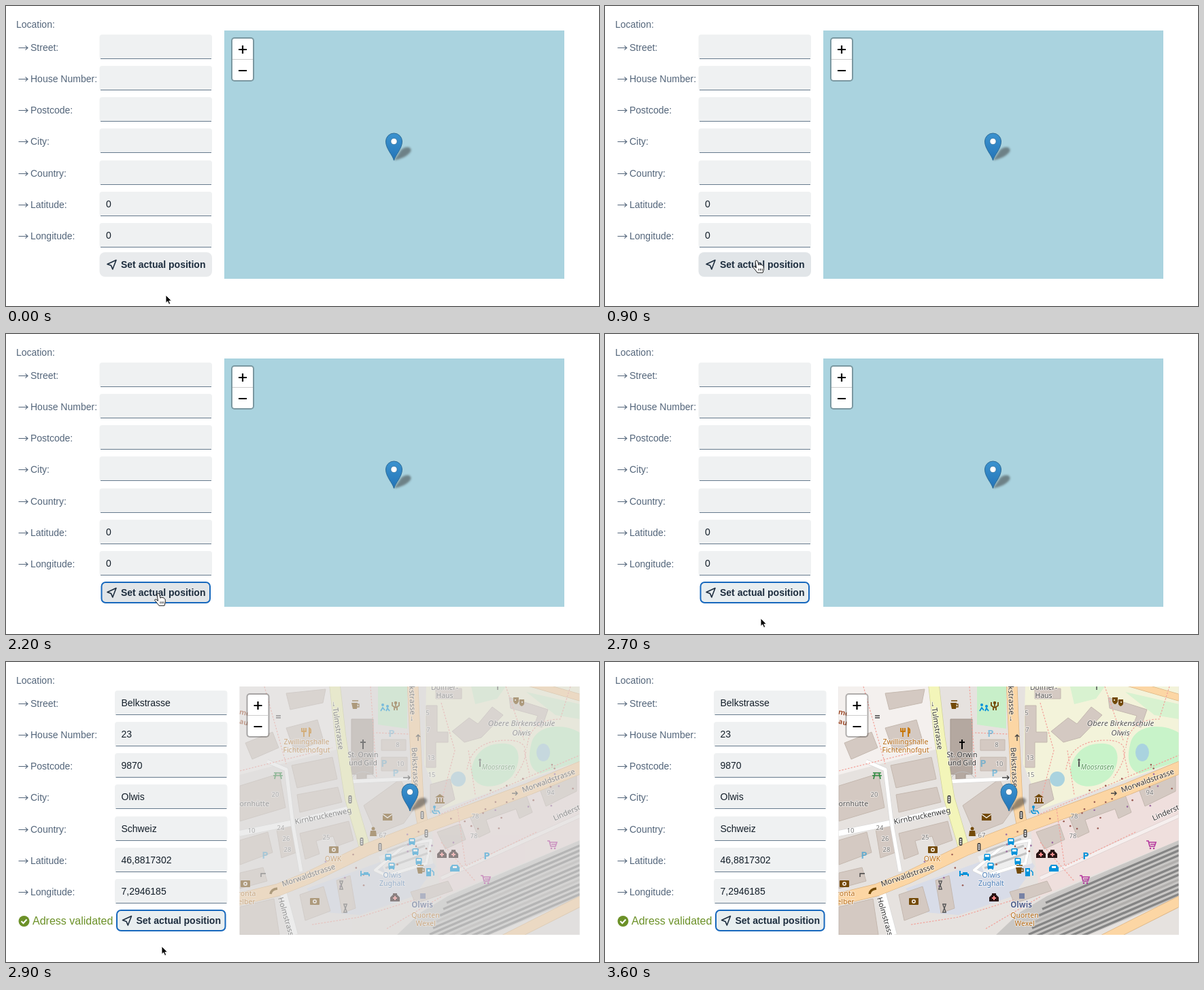
An HTML page that plays this animation: 872 by 441 pixels, repeating every 5.5 s.

```html
<!DOCTYPE html>
<html lang="en">
<head>
<meta charset="utf-8">
<title>Location form</title>
<style>
html, body { margin: 0; width: 100%; height: 100%; overflow: hidden; background: #fff }
svg { display: block; font: 14px "Liberation Sans", Arial, sans-serif }
.label { fill: #53657a }
.value { fill: #131e29 }
.map text { font: 10.5px "Noto Sans", sans-serif; text-anchor: middle; fill: #333;
  stroke: #fff; stroke-opacity: .55; stroke-width: 2px; paint-order: stroke; stroke-linejoin: round }
.map .num { font-size: 9.5px; fill: #777 }
.map .sign { font-weight: bold; font-size: 15px; stroke: none }
</style>
</head>
<body>
<svg id="stage" width="872" height="441" viewBox="0 0 872 441"></svg>
<script>
const path = (d, fill, stroke = 'none', width = 1, more = '') =>
  `<path d="${d}" fill="${fill}" stroke="${stroke}" stroke-width="${width}" ${more}/>`;
const line = (d, color, width, more = '') => path(d, 'none', color, width, more);
const rect = (x, y, w, h, fill, more = '') =>
  `<rect x="${x}" y="${y}" width="${w}" height="${h}" fill="${fill}" ${more}/>`;
const circle = (x, y, r, fill, more = '') => `<circle cx="${x}" cy="${y}" r="${r}" fill="${fill}" ${more}/>`;
const at = (x, y, body) => `<g transform="translate(${x} ${y})">${body}</g>`;
const text = (x, y, s, more = '') => `<text x="${x}" y="${y}" ${more}>${s}</text>`;
const mapText = (x, y, s, angle = 0, style = '') =>
  text(x, y, s, `transform="rotate(${angle} ${x} ${y})" style="${style}"`);
const road = (d, fill, casing, width) =>
  line(d, casing, width + 1.4, 'stroke-linejoin="round"') + line(d, fill, width, 'stroke-linejoin="round"');
const each = (places, draw) => places.map(([x, y]) => at(x, y, draw)).join('');

let seed = 7;
const random = () => (seed = seed * 16807 % 2147483647) / 2147483647;

const rows = [
  ['Street', 'Belkstrasse'], ['House Number', '23'], ['Postcode', '9870'], ['City', 'Olwis'],
  ['Country', 'Schweiz'], ['Latitude', '46,8817302'], ['Longitude', '7,2946185']
];
const rowY = i => Math.round(42 + i * 46.15);

const labels = text(15, 32, 'Location:', 'class="label"') + rows.map(([name], i) => {
  const y = rowY(i) + 19.5;
  return line(`M18.5 ${y}H32M28.5 ${y - 3.2}L32 ${y} 28.5 ${y + 3.2}`, '#53657a', 1.1) +
    text(36, y + 4.3, name + ':', 'class="label"');
}).join('');

const fields = rows.map(([, value], i) => {
  const y = rowY(i);
  return rect(137.5, y, 165.5, 36, '#eff1f2', 'rx="4"') +
    line(`M139 ${y + 35.5}H302`, '#667a8d', 1) +
    `<text class="value" x="147" y="${y + 23}" data-before="${i > 4 ? 0 : ''}" data-after="${value}"></text>`;
}).join('');

const button = `<g id="button" fill="#1d2d3e">
  <rect id="halo" x="138" y="362.5" width="164" height="35" rx="8" fill="#fff" stroke="#0064d9"/>
  <rect id="face" rx="8"/>
  <path id="plane" d="M149 379.5L162 373.5 156.8 387 154.6 381.6z" fill="none" stroke-width="1.6" stroke-linejoin="round"/>
  ${text(169, 385, 'Set actual position', 'font-weight="bold"')}</g>`;

const zoom = rect(331, 46, 34, 65, '#000', 'rx="5" opacity=".28"') + rect(333, 48, 30, 61, '#fff', 'rx="3"') +
  line('M333 78.5H363', '#ccc', 1) + line('M342 64H354M348 58V70M342 95H354', '#000', 2.2);

// The tip of the pin is the origin
const pin = path('M0 0L11-16C18-22 26-20 25-14 22-7 10-2 0 0z', '#333', 'none', 0, 'opacity=".5" filter="url(#soft)"') +
  path('M0 0C-2-8-12-17-12-28A12 12 0 0 1 12-28C12-17 2-8 0 0z', 'url(#blue)', '#2e6c97') +
  circle(0, -28, 4.6, '#fff', 'stroke="#2e6c97" stroke-width=".7"');

function buildMap() {
  const brown = '#734a08', blue = '#0092da', orange = '#fcd6a4', edge = '#dcb482';
  let s = rect(343, 36, 501, 365, '#e6e2df');

  // Land use
  s += path('M343 36H480L488 128 343 166z', '#f4f0ee') + path('M625 240L844 160V262L640 345z', '#efdfdd');
  s += path('M618 36H844V146L642 216 615 150z', '#f3f3da') + path('M547 36H590V98L547 92z', '#c8efc9');
  s += path('M684 160C688 132 708 118 735 120 758 122 758 148 744 168 728 186 688 192 684 160z', '#c8f3c9');
  s += path('M772 122C778 90 822 90 844 104V146L786 164C768 158 768 138 772 122z', '#c8f3c9');
  s += path('M684 36H735L722 54 690 62z M765 44L844 62V84L808 78z', '#d8f2d0');
  s += circle(665, 172, 11, '#aad3df') + '<ellipse cx="790" cy="133" rx="10" ry="13" fill="#aad3df"/>';
  s += path('M442 333L545 296 610 270 632 300 600 344 520 372 470 368z', '#d8dce8');
  s += path('M548 286L622 258 628 296 560 316z', '#eeeeee');

  // Railway
  s += path('M610 368L650 344 844 262V346L712 401H575z', '#c9c7c5');
  for (let k = 0; k < 12; k++) {
    const x = 648 - k * 5, y = 354 + k * 9.3;
    s += line(`M${x} ${y}L844 ${y - (844 - x) * .43}`, k % 4 == 3 ? '#b0aeac' : '#858585', 3.4);
  }
  s += path('M712 401L844 346V401z', '#e6e2df');

  // Buildings
  const west = 'M352 119L392 103 401 126 362 143zM412 97L458 85 467 116 424 131zM412 46L470 40 466 60 418 70z' +
    'M344 182L402 164 411 214 344 234zM420 152L480 140 487 172 428 185zM428 195L488 184 494 206 432 221z';
  const south = 'M432 252L504 234 511 262 486 271 481 256 456 263 461 282 440 290zM344 262L385 250 392 280 344 298z' +
    'M397 240L418 233 427 280 405 288zM344 310L378 302 384 322 344 333zM344 360L394 348 402 401H344z' +
    'M432 342L467 330 477 366 440 380zM486 321L506 314 514 362 494 369zM595 338L650 322 657 336 602 355z';
  const middle = 'M552 114H588V130H552zM552 140H590V160H552zM526 211L580 172 600 216 585 237 544 253z' +
    'M618 64H634V103H650V118H632V155H618zM624 180L653 172 660 202 624 222zM632 39H670V54H632z';
  const east = 'M656 102L681 82 694 91 715 66 731 78 699 111 674 118zM740 52L797 70 788 96 777 92 782 79 742 68z' +
    'M680 222L764 193 774 221 755 230 750 216 706 232 712 250 695 258zM785 187L839 166V190L794 212zM634 250L668 238 676 261 646 275z';
  for (const d of [west, south, middle, east]) s += path(d, '#d4c9c2', '#c4b8af');
  s += path('M508 84H540V165H530V172H516V165H508z', '#b4a8a0', '#a0938b');
  s += line('M508 172C515 158 535 158 545 172', '#bbb', 1);

  // Streets
  s += road('M343 252L418 237 512 214', '#fff', '#d8d8d8', 8) + road('M384 146L412 158 422 240 434 308', '#fff', '#d8d8d8', 5);
  s += road('M404 326L424 401', '#fff', '#d8d8d8', 10) + road('M500 176L606 171', '#fff', '#d8d8d8', 5);
  s += road('M543 306L588 268 625 262 618 296 560 314z', '#fff', '#d8d8d8', 4) + road('M640 318L844 226', '#f6efee', '#dccfce', 5);
  s += road('M483 30L492 110 506 200 528 274', '#f3f5b9', '#cfd09a', 15);
  s += road('M598 30L601 100 606 200 614 245', orange, edge, 15);
  s += road('M338 350L400 335 445 317 530 276 615 243 700 212 770 186 850 153', orange, edge, 17);
  s += road('M725 412L850 349', orange, edge, 14) + road('M760 28L850 54', orange, edge, 9);
  s += line('M560 279L612 260M556 291L616 270M558 303L620 281', '#c4c4c4', 3);

  // Footpaths
  const walks = 'M344 160L480 126M380 36L412 150M536 36L545 170M544 104L594 106M636 225L844 137M640 60L660 130 640 206' +
    'M680 130L690 195M678 158Q684 116 735 115T748 170M762 130L770 166M735 36L762 115M830 36L815 84Q770 84 766 126' +
    'M640 265L690 322M560 392L640 345M450 386L520 375 600 350M664 216L676 300 780 250';
  s += line(walks, '#f2a29a', 1.2, 'stroke-dasharray="2.5 2"');
  for (let i = 0; i < 45; i++) {
    const x = 470 + random() * 365;
    s += circle(x, 375 - (x - 430) * .43 - random() * 70, 1.3, i % 3 ? '#9b5d55' : '#9a6aa0');
  }

  // Symbols
  s += each([[482, 276], [454, 352], [352, 326]], rect(-7, -5, 14, 10, brown, 'rx="1"') +
    circle(0, 0, 3, '#f2e9df') + circle(0, 0, 1.3, brown));
  s += each([[506, 202], [523, 264], [550, 272], [612, 225], [618, 252]], rect(-2.5, -6, 5, 12, '#444', 'rx="2"') +
    circle(0, -3, 1.3, '#ddd') + circle(0, 0, 1.3, '#ddd') + circle(0, 3, 1.3, '#ddd'));
  s += each([[597, 264], [562, 287], [602, 279], [567, 300], [607, 293]], rect(-4.5, -5, 9, 9, blue, 'rx="1.5"') +
    rect(-3, -3.5, 6, 3, '#fff') + line('M-3 3V5M3 3V5', blue, 2));
  s += each([[641, 282], [658, 282], [572, 346]], path('M-3-6H3V-4L7 0V6H-7V0L-3-4z', '#281414') +
    line('M-3 1H3M0-2V4', '#ff8d8d', 2));
  s += each([[803, 268], [705, 319]], line('M-7-5H-4L-2 3H5L7-3H-3M-1 0H5', '#b5399f', 1.7) +
    circle(-1, 6, 1.3, '#b5399f') + circle(4, 6, 1.3, '#b5399f'));
  s += each([[513, 63], [609, 305]], path('M-5-3H4L3 6H-3z', brown) + line('M-4-6H5M4-1H6V3H3', brown, 1.3));
  s += each([[493, 328], [499, 362]], line('M-3-6H3M-3 6H3M-2-5L2 5M2-5L-2 5', '#555', 1.4));
  s += at(561, 228, rect(-7, -5, 14, 10, brown) + line('M-7-4L0 1 7-4', '#fff', 1.2));
  s += at(442, 103, line('M-4-6V7M-7-6V-1H-1V-6M4 7V-6Q7-5 6 1H4', '#c77400', 1.8));
  s += at(638, 201, path('M-7-2L0-7 7-2zM-7 5H7V7H-7z', brown) + line('M-4-1V5M0-1V5M4-1V5', brown, 2));
  s += at(754, 58, path('M-8-6H0V0Q-4 8-8 0zM1-3H8V4Q4 10 1 4z', brown) + circle(-5, -2, 1, '#fff') + circle(5, 1, 1, '#fff'));
  s += at(540, 250, circle(0, -5, 2.5, brown) + path('M-4-2H4L5 6H-5z', brown));
  s += at(394, 337, line('M-5 4Q-4-3 5-4', brown, 3.5));
  s += at(400, 167, line('M-6-4H6M-7 0H7M-3-4L-5 5M3-4L5 5', '#2f8a42', 1.7));
  s += at(525, 121, line('M0-7V7M-4-3H4', '#000', 2));
  s += at(528, 311, line('M-6-4V4M-6 1H6V4M-2-1H5', blue, 2));
  s += at(660, 303, path('M-7 5V-1L-4-5H4L7-1V5z', blue) + rect(-3, -3, 6, 3, '#fff'));
  s += at(623, 309, rect(-5, -6, 7, 12, blue) + line('M3-3L6 0V5', blue, 1.5) + rect(-3, -4, 3, 3, '#fff'));
  s += at(632, 217, circle(-2, -4, 2, blue) + line('M-2-3V2H4L6 6M-5 1Q-5 7 2 5', blue, 1.6));
  s += at(557, 67, circle(-3, -4, 2, blue) + circle(4, -2, 2, blue) + line('M-6 5L-3 0 0 4M2 5L4 1 7 5', blue, 1.8));
  s += at(573, 64, circle(0, -4, 2.2, brown) + line('M-5-5V0L-2 2V7M5-5V0L2 2V7M0-2V4', brown, 1.8));
  s += at(697, 148, circle(0, -4, 1.8, '#555') + line('M0-2V6', '#555', 2));
  s += rect(609, 340, 8, 8, '#7882a5');
  s += line('M397 82H404M397 79H404M375 316V311H382M723 36V41M744 193H752M749 190L752 193 749 196M606 116V107M603 110L606 107 609 110M584 170H594M591 167L594 170 591 173', '#444', 1.4);

  // Lettering
  const parking = (x, y, opacity) => text(x, y, 'P', `class="sign" style="fill:${blue};opacity:${opacity}"`);
  s += parking(567, 110, .4) + parking(556, 154, .4) + parking(573, 168, .4) + parking(381, 289, .5) + parking(707, 290, 1);
  const numbers = [[5, 620, 78], [7, 621, 103], [13, 625, 144], [15, 626, 169], [8, 576, 125], [10, 580, 153], [20, 396, 198],
    [10, 361, 251], [24, 404, 247], [26, 412, 263], [28, 414, 279], [25, 471, 261], [67, 554, 258], [78, 690, 230], [78, 688, 259], [94, 801, 195]];
  for (const [n, x, y] of numbers) s += text(x, y, n, 'class="num"');

  const street = 'font-size:11px', food = 'fill:#b86d18', water = 'fill:#4c7fb9', gray = 'fill:#555';
  const school = gray + ';font-style:italic;font-size:11.5px', cut = 'fill:#a05030;font-weight:bold';
  s += mapText(446, 317, 'Morwaldstrasse', -19, street) + mapText(799, 178, 'Morwaldstrasse', -20, street);
  s += mapText(484, 93, '→Tulmstrasse', 82, street) + mapText(598, 155, 'Belkstrasse', 87, street);
  s += mapText(594, 62, 'kstrasse→', 88, street) + mapText(467, 230, 'Kirnbruckenweg', -12, street);
  s += mapText(409, 378, 'Holmstrasse', 74, street) + mapText(826, 225, 'Linderst', -24, street);
  s += mapText(442, 121, 'Zwillingshalle', 0, food) + mapText(442, 133, 'Fichtenhofgut', 0, food);
  s += mapText(525, 140, 'St. Orwin') + mapText(525, 152, 'und Gild');
  s += mapText(758, 94, 'Obere Birkenschule', 0, school) + mapText(758, 108, 'Olwis', 0, school);
  s += mapText(724, 158, 'Moosrasen', 0, 'fill:#5d9a5f;font-style:italic;font-size:10px');
  s += mapText(362, 212, 'Kornhütte', 0, gray) + mapText(645, 41, 'Dolmer-', 0, gray) + mapText(645, 53, 'Haus', 0, gray);
  s += mapText(481, 293, 'OWK', 0, food) + mapText(354, 344, 'ronta', 0, food) + mapText(354, 356, 'elber', 0, food);
  s += mapText(568, 317, 'Olwis', 0, water) + mapText(568, 329, 'Zughalt', 0, water);
  s += mapText(612, 361, 'Olwis', 0, 'fill:#53628e;font-weight:bold;font-size:11.5px');
  s += mapText(617, 376, 'Quorten', 0, food) + mapText(617, 388, 'Wexel', 0, food);
  s += mapText(349, 78, 'lme', 12, cut) + mapText(349, 92, 'au', 12, cut);
  return s;
}

const stage = document.getElementById('stage');
stage.innerHTML = `<defs>
  <linearGradient id="blue" x2="0" y2="1"><stop stop-color="#3c93cf"/><stop offset="1" stop-color="#2374b8"/></linearGradient>
  <filter id="soft"><feGaussianBlur stdDeviation="1.8"/></filter>
  <clipPath id="frame"><rect x="343.5" y="36" width="500" height="365"/></clipPath></defs>
  ${labels}
  <g id="ok">${circle(26.5, 381, 8, '#6c9128')}${line('M22.5 381L25.5 384 30.5 378.5', '#fff', 2)}
    ${text(39, 385.5, 'Adress validated', 'font-size="16" fill="#6c9128"')}</g>
  <g class="shift">${fields}${button}<rect id="sea" x="321" y="36" width="500" height="365"/></g>
  <g id="map" class="map" clip-path="url(#frame)">${buildMap()}</g>
  <g class="shift">${zoom}</g><g id="pin">${pin}</g>
  <circle id="ripple" cx="223" cy="378" fill="#fff" fill-opacity=".3" stroke="#d9a5aa" stroke-width="3"/>
  <g id="cursor" stroke-linejoin="round">
    <path id="arrow" d="M0 0V11.5L2.7 9.1 4.6 13.5 6.7 12.6 4.8 8.4H8.4z" fill="#000" stroke="#fff" stroke-width=".9"/>
    <path id="hand" d="M-1 1Q1-1 2.5 1L4 7 5 5.5 7 6.5 8 6 10 7.5 11 8.5 11.5 13 10 18H2L-1 14-4.5 10Q-4 8-2 9L.5 11zM4 12V15M6.5 12V15M9 12V15" fill="#fff" stroke="#222" stroke-width="1"/>
  </g>`;

const el = Object.fromEntries([...stage.querySelectorAll('[id]')].map(e => [e.id, e]));
const values = stage.querySelectorAll('.value');
const set = (e, attrs) => { for (const k in attrs) e.setAttribute(k, attrs[k]); };
const show = (e, on) => set(e, { display: on ? 'inline' : 'none' });

// time, x, y of the pointer
const track = [[0, 235, 425], [500, 231, 410], [600, 229, 396], [900, 222, 374], [2100, 222, 374],
  [2400, 225, 396], [2700, 229, 418], [3300, 229, 418], [3500, 265, 434], [3600, 280, 445]];

function pointer(t) {
  const i = track.findIndex(p => p[0] > t);
  if (i < 0) return [280, 445];
  const [t0, x0, y0] = track[i - 1], [t1, x1, y1] = track[i], u = (t - t0) / (t1 - t0);
  return [x0 + (x1 - x0) * u, y0 + (y1 - y0) * u];
}

function draw(now) {
  const t = Math.floor(now % 5500 / 100) * 100;
  const filled = t >= 2800, focused = t >= 1500, pressed = t == 1500;
  const [x, y] = pointer(t), over = y < 398;

  stage.querySelectorAll('.shift').forEach(g => set(g, { transform: `translate(${filled ? 22.5 : 0} 0)` }));
  values.forEach(v => v.textContent = filled ? v.dataset.after : v.dataset.before);
  show(el.ok, filled);
  set(el.sea, { fill: filled ? '#ddd' : '#aad3df' });
  set(el.map, { opacity: t < 2900 ? 0 : t < 3000 ? .45 : t < 3100 ? .97 : 1 });
  show(el.pin, t != 2800);
  set(el.pin, { transform: filled ? 'translate(594 219)' : 'translate(570.5 227)' });

  const inset = focused ? 3 : 0;
  set(el.face, {
    x: 137.5 + inset, y: 362 + inset, width: 165.5 - 2 * inset, height: 36 - 2 * inset, rx: focused ? 6 : 8,
    fill: pressed ? '#fff' : over ? '#e1e5e8' : focused ? '#e8eef0' : '#e9ebed',
    stroke: focused ? '#1768bd' : 'none', 'stroke-width': 2
  });
  show(el.halo, pressed);
  const ink = pressed ? '#0064d9' : '#1d2d3e';
  set(el.button, { fill: ink });
  set(el.plane, { stroke: ink });

  const age = (t - 1500) / 400, ringing = age >= 0 && age < 1;
  show(el.ripple, ringing);
  if (ringing) set(el.ripple, { r: 9.5 + 13 * age, opacity: .6 * (1 - age) });

  set(el.cursor, { transform: `translate(${x} ${y})` });
  show(el.cursor, t < 3600);
  show(el.arrow, !over);
  show(el.hand, over);
}

const start = performance.now();
function tick() {
  draw(performance.now() - start);
  requestAnimationFrame(tick);
}
tick();
</script>
</body>
</html>
```
